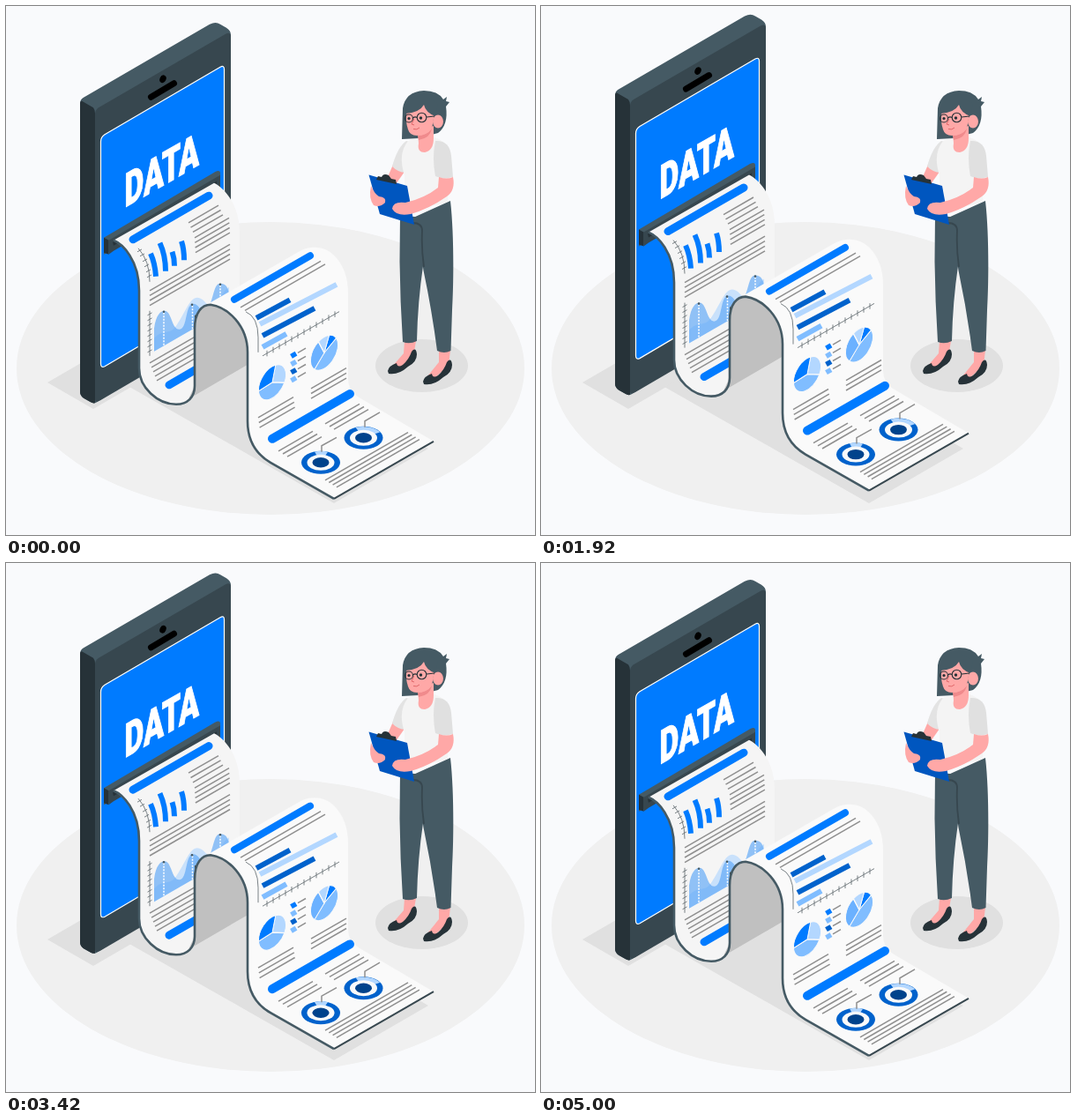
An HTML page that plays this animation: 600 px wide and 600 px high, repeating every 5.08 s.

```html
<!DOCTYPE html>
<html lang="en">
<head>
<meta charset="utf-8">
<title>Data report</title>
<style>
  html, body { margin: 0; width: 100%; height: 100%; overflow: hidden; background: #f9fafc; }
  svg { display: block; width: 100%; height: 100%; }
  .rule { fill: none; stroke: #8f8f8f; stroke-width: 1.5; }
  .axis { fill: none; stroke: #6b7479; stroke-width: .9; }
  .bar { fill: none; stroke-linecap: round; stroke: #007bff; }
  .col { fill: none; stroke-width: 6; }
  .ink { fill: none; stroke: #263238; stroke-width: 1.1; }
  .edge { fill: none; stroke: #455a64; stroke-width: 2.6; stroke-linejoin: round; }
  .skin { fill: #ffa8a7; }
  .dark { fill: #263238; }
  .hair { fill: #455a64; }
  text { font: 900 53px Roboto, Arial, sans-serif; fill: #fff; stroke: #fff; stroke-width: 1.2; }
</style>
</head>
<body>
<svg viewBox="0 0 600 600">
  <defs>
    <path id="sheet1" d="M122 265L236 200C245 204 265 222 265 257V320L214 350V430C214 443 206 451 193 451C172 451 151 432 151 410V322C151 287 132 269 122 265Z"/>
    <clipPath id="clip1"><use href="#sheet1"/></clipPath>
  </defs>

  <ellipse cx="300" cy="411" rx="288" ry="166" fill="#f0f0f0"/>
  <g fill="#e0e0e0">
    <ellipse cx="471.500" cy="408" rx="52.500" ry="30"/>
    <path d="M47 427L99 457L225 384L173 354Z"/>
    <path d="M140 432L372 564L479 502L250 368Z"/>
  </g>

  <g id="device">
    <path class="hair" d="M84 110Q84 105 88 103L231 20Q238 16.500 243 20L250 24Q255 27 255 32V350L104 448Q100 451 96 448.500L88 444Q84 441 84 437Z"/>
    <path class="dark" d="M84 110Q84 107 86 107L99 114.500Q101 117 101 121V449.500Q98 450 96 448.500L88 444Q84 441 84 437Z"/>
    <path fill="#37474f" d="M101 122Q101 117 105 114.500L249 31Q255 28 255 34V360L107 446.500Q101 450 101 445Z"/>
    <path d="M107.500 153Q107.500 148 112 145L243 68.500Q247.500 66 247.500 71V328L112 408Q107.500 410 107.500 405Z" fill="#007bff" stroke="#fff" stroke-width="1.200"/>
    <ellipse cx="178" cy="82" rx="3.500" ry="4.500" transform="rotate(25 178 82)"/>
    <path d="M164.500 102.500L190.500 87" stroke="#000" stroke-width="7" stroke-linecap="round"/>
    <text transform="matrix(.635 -.366 0 1 134.500 228)">DATA</text>

    <path class="hair" d="M111 262L237 187.500Q243 184.500 243 189V206L122 276L111 281Z"/>
    <path class="dark" d="M111 262L116.500 265V281L111 279Z"/>
    <path fill="#37474f" d="M116.500 265L243 191V206L122 277L116.500 281Z"/>
    <path class="dark" d="M121 267L239 198V204L122 271Z"/>

    <use href="#sheet1" fill="#f5f5f5"/>
    <g id="page1" clip-path="url(#clip1)"></g>

    <path d="M207 445L214 430V365C214 347 222 338 232 338C252 341 274 362 274 392V406Z" fill="#c0c0c0"/>
    <path d="M219 343L332 278C345 270 362 272 372 282Q388 298 388 325V422Q388 436 400 443L485 493L372 558L300 517Q274 502 274 470V392C274 362 252 341 232 338Q224 339 219 343Z" fill="#fafafa"/>
    <g id="page2"></g>
    <path class="edge" d="M122 265C132 269 151 287 151 322V410C151 432 172 451 193 451C206 451 214 443 214 430V365C214 347 222 338 232 338C252 341 274 362 274 392V470Q274 502 300 517L372 558"/>
    <path d="M372 558L485 493" stroke="#37474f" stroke-width="2"/>
  </g>

  <g id="woman">
    <path class="skin" d="M452 380H465L462 398L445 412L438 409L451 394ZM491 390H504L502 408L486 422L478 420L491 404Z"/>
    <path id="shoe" class="dark" d="M433 414Q434 408 443 405Q444 411 450 407Q457 401 460 392Q465 386 466 395Q466 404 456 409Q445 419 434 417Z"/>
    <use href="#shoe" x="40" y="12"/>
    <path class="hair" d="M447 238L446.500 290Q447 335 450 381Q458 384 466 380Q467 335 473 295L480 240Z"/>
    <path class="hair" d="M462 240L504 221C508 255 508 310 506 345L504.500 391Q497 395 489 391Q483 345 473.500 300Q469 270 472 248Z"/>
    <path d="M461 246Q472 246 472 255Q471 275 474 296" fill="none" stroke="#37474f" stroke-width="1.800"/>
    <path class="skin" d="M439 180L432 196L440 205L452 188Z"/>
    <path d="M454 153Q444 160 438 182Q444 188 452 189L466 156Z" fill="#e3e3e3"/>
    <path d="M456 153Q462 150 468 151L486 149Q498 152 503 165L501 222Q478 232 452 220V192Q444 168 456 153Z" fill="#f4f4f4"/>
    <path d="M487 153Q503 152 505 170L507 194Q496 197 487 193Q483 172 487 153Z" fill="#e0e0e0"/>

    <path class="hair" d="M449 151L450 116Q453 97 474 96Q490 96 496 106L500 103L499 108L503 109L499 114Q502 135 490 144L468 150Z"/>
    <path class="skin" d="M467 142L485 136V150Q485 164 475 166Q466 166 468 156Z"/>
    <path d="M467 147Q477 147 483 139Q481 150 468 152Z" fill="#f08a8c"/>
    <path class="skin" d="M455 118Q452.500 130 456 140Q458 147 466 147Q477 147 483 139L486 122L475 111Z"/>
    <path class="hair" d="M453 122Q469 121 474 112Q476 121 487 125L490 110L470 100L454 108Z"/>
    <ellipse class="skin" cx="490" cy="131" rx="6" ry="7.500"/>
    <g class="ink">
      <circle cx="457" cy="127.500" r="4.500"/>
      <circle cx="471.500" cy="126.500" r="5.300"/>
      <path d="M461.500 127Q464 125 466 126.500M477 126L486 125"/>
      <path d="M463 128L460 134L463 135M462 139.500Q466 141 469 138" stroke="#e0686b" stroke-width="1"/>
    </g>
    <circle class="dark" cx="457" cy="127.500" r="1.600"/>
    <circle class="dark" cx="470.500" cy="127" r="1.700"/>

    <path d="M411.500 191.500L455 204L463 248L424 236Z" fill="#0056bf"/>
    <path class="dark" d="M420 197L422 193L426 194Q428 189 434 192L437 196L442 197L443 202Z"/>
    <path class="skin" d="M414 204Q411 218 417 226Q424 229 430 223Q432 217 423 216Q418 213 414 204Z"/>
    <path class="skin" d="M491 194Q500 197 507 194Q510 209 500 216Q480 230 459 236Q443 239 438 230Q439 221 453 223Q475 218 490 206Z"/>
  </g>
</svg>

<script>
const SLOPE = 0.577, LOOP = 5080, CYCLE = 5000, STEP = 1000 / 12, RISE = 12, REST = 0.8;
const BLUE = '#007bff', DEEP = '#0062cc', SOFT = '#80bdff', PALE = '#b3d7ff';

const el = id => document.getElementById(id);
const path = (d, cls = '', extra = '') => `<path d="${d}" class="${cls}" ${extra}/>`;
const line = (x, y, w, cls, extra) => path(`M${x} ${y}l${w} ${-w * SLOPE}`, cls, extra);
const bar = (x, y, w, size) => line(x, y, w, 'bar', `stroke-width="${size}"`);
const column = (d, color = BLUE) => path(d, 'col', `stroke="${color}"`);

// A stack of parallel text rules, each shifted by (dx, dy)
const rules = (x, y, w, n, dx, dy) =>
  Array.from({ length: n }, (_, i) => line(x + i * dx, y + i * dy, w, 'rule')).join('');

function ticks(x, y, n, dx, dy, tx, ty) {
  let d = '';
  for (let i = 0; i < n; i++) d += `M${x + i * dx} ${y + i * dy}l${tx} ${ty}`;
  return path(d, 'axis');
}

// Slices are [from, to, color], in degrees clockwise from the top
function pie(x, y, r, slices) {
  const at = deg => {
    const a = deg * Math.PI / 180;
    return `${r * Math.sin(a)} ${-r * Math.cos(a)}`;
  };
  const parts = slices.map(([from, to, color]) =>
    path(`M0 0L${at(from)}A${r} ${r} 0 ${+(to - from > 180)} 1 ${at(to)}Z`, '', `fill="${color}"`));
  return `<g transform="matrix(.866 -.5 0 1 ${x} ${y})" stroke="#fafafa" stroke-width="1.2">${parts.join('')}</g>`;
}

function donut(x, y, arc) {
  const ring = (rx, ry, color) => `<ellipse rx="${rx}" ry="${ry}" fill="${color}"/>`;
  return `<g transform="translate(${x} ${y})">${ring(22, 13, DEEP)}${path(arc, '', `fill="${PALE}"`)}
    ${ring(15.5, 9, '#fafafa')}${ring(9.5, 5.7, '#00438c')}</g>`;
}

const wave1 = 'M168 391V365C170 350 175 345 180 345C188 345 188 367 197 366C206 365 203 338 212 337C220 337 220 348 226 344C236 338 234 314 243 314C250 314 252 319 253 326V342Z';
const wave2 = 'M168 391V376C178 365 186 373 193 362C203 348 208 330 217 330C226 330 228 344 236 337C243 332 248 320 253 318V342Z';

el('page1').innerHTML =
  bar(144, 264, 86, 9) +
  path('M150 274Q163 288 163 312', 'axis') +
  [[149, 278], [152, 283], [155, 289], [157, 295], [159, 301], [160, 307]]
    .map(([x, y]) => line(x, y, 5, 'axis')).join('') +
  column('M164 280Q169 291 170 306') + column('M174.500 268Q181 282 181 300') +
  column('M188.500 278Q191 285 191 294') + column('M199 266Q202 275 202 287.500') +
  rules(207, 245, 34, 3, 2.5, 5.3) + rules(214, 262, 39, 4, .3, 5.6) +
  rules(163, 322, 91, 4, 0, 5.6) +
  path('M163 345V396', 'axis') + ticks(160.5, 350, 8, 0, 6, 5, -2.9) +
  path(wave2, '', `fill="${PALE}" opacity=".65"`) + path(wave1, '', 'fill="#5ba7f7" opacity=".65"') +
  path('M179 347V384M211.500 339V366M243 316V348', '', 'stroke="#fff" stroke-width="1.5" stroke-dasharray="2 1.5"') +
  [[179, 346], [211, 338], [243, 315]].map(([x, y]) => `<circle cx="${x}" cy="${y}" r="1.3" fill="#455a64"/>`).join('') +
  rules(163, 404, 54, 5, 2, 5) +
  bar(185, 429, 40, 9);

const legend = [BLUE, SOFT, DEEP, SOFT].map((color, i) => {
  const y = 395.5 + i * 9.2;
  return line(323.5, y + 1, 5.5, '', `stroke="${color}" stroke-width="5.5"`) + line(331, y - 3, 9, 'rule');
}).join('');

el('page2').innerHTML =
  bar(259, 332, 86, 8) +
  rules(266, 341, 91, 2, 5, 3.5) +
  path('M272 346Q286 352 286 375V392', 'axis') +
  column('M284 353L322 332.500', DEEP) + column('M288 360L375 315', PALE) +
  column('M291 373L350 342', DEEP) + column('M291 386L318 371', SOFT) +
  line(291, 396, 87, 'axis') + ticks(296, 390, 12, 7, -7 * SLOPE, 0, 6.5) +
  pie(302, 426, 18, [[14, 118, PALE], [118, 267, SOFT], [267, 374, BLUE]]) +
  pie(361, 392.5, 18, [[21, 61, BLUE], [61, 226, SOFT], [226, 335, '#6bb1ff'], [335, 381, PALE]]) +
  legend +
  rules(286, 466, 40, 3, .8, 5.7) + rules(346, 433, 40, 3, 0, 5.7) +
  bar(302, 490, 88, 10) +
  rules(362, 473, 39, 3, 5, 3.2) + rules(309, 504, 39, 3, 5, 3.2) +
  donut(357, 517, 'M0 0L-7 -12.300Q1 -14 8 -12.100Z') +
  donut(405.5, 489, 'M0 0L-9 -11.900Q8 -15 19 -6.500Z') +
  path('M358 505V498L375 488.500M407 477V470L424 460', 'rule') +
  rules(362, 537, 94, 4, 4.3, 2.7);

// Even rise and fall, advancing twelve times a second
function draw(now) {
  const tick = Math.floor((now % LOOP + 5) / STEP);
  const phase = Math.min(tick * STEP / CYCLE, 1);
  const lift = RISE * (1 - Math.abs(1 - 2 * phase));
  el('device').setAttribute('transform', `translate(0 ${REST - lift})`);
  requestAnimationFrame(draw);
}
draw(0);
</script>
</body>
</html>
```
